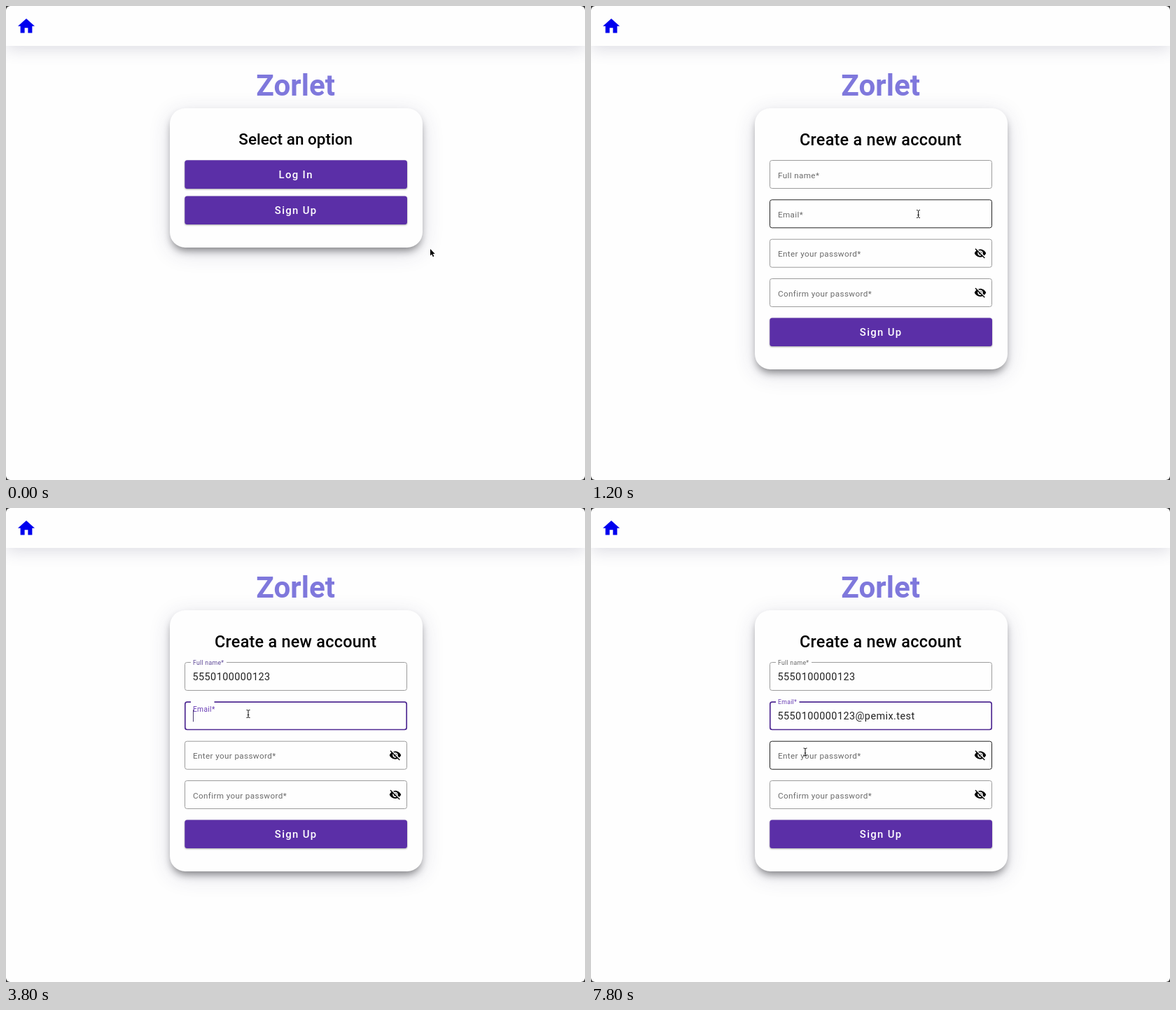
An HTML page that plays this animation: 827x677 px, repeating every 8 s.

```html
<!DOCTYPE html>
<html lang="en">
<head>
<meta charset="utf-8">
<title>Sign up</title>
<style>
  html, body { margin: 0; width: 100%; height: 100%; overflow: hidden; background: #3a3a3a; }
  #stage { position: relative; width: 827px; height: 677px; overflow: hidden; border-radius: 6px; background: #fefefe; }
  #bar { height: 57px; box-shadow: 0 5px 22px rgba(90, 90, 125, .2); }
  #card {
    position: absolute; left: 234px; top: 146px; width: 361px; border-radius: 22px; background: #fefefe;
    box-shadow: 0 7px 12px -3px rgba(0, 0, 0, .45), 0 7px 30px rgba(50, 50, 93, .17);
  }
  svg { position: absolute; left: 0; top: 0; }
  text { font-family: Roboto, sans-serif; white-space: pre; }
  .title { font-size: 42.2px; font-weight: 700; fill: #7f78dc; text-anchor: middle; }
  .heading { font-weight: 500; text-anchor: middle; }
  .button { filter: drop-shadow(0 1px 1px rgba(0, 0, 0, .35)); }
  .caption { font-size: 14.9px; font-weight: 500; letter-spacing: .0893em; fill: #fff; text-anchor: middle; }
  .label { letter-spacing: .031em; }
  .value { font-size: 14.4px; letter-spacing: .03125em; fill: #222; }
</style>
</head>
<body>
<div id="stage">
  <div id="bar"></div>
  <div id="card"></div>
  <svg width="827" height="677">
    <defs>
      <path id="hidden" d="M12 7c2.76 0 5 2.24 5 5 0 .65-.13 1.26-.36 1.83l2.92 2.92c1.51-1.26 2.7-2.89 3.43-4.75-1.73-4.39-6-7.5-11-7.5-1.4 0-2.74.25-3.98.7l2.16 2.16C10.74 7.13 11.35 7 12 7zM2 4.27l2.28 2.28.46.46C3.08 8.3 1.78 10.02 1 12c1.73 4.39 6 7.5 11 7.5 1.55 0 3.03-.3 4.38-.84l.42.42L19.73 22 21 20.73 3.27 3 2 4.27zM7.53 9.8l1.55 1.55c-.05.21-.08.43-.08.65 0 1.66 1.34 3 3 3 .22 0 .44-.03.65-.08l1.55 1.55c-.67.33-1.41.53-2.2.53-2.76 0-5-2.24-5-5 0-.79.2-1.53.53-2.2zm4.31-.78l3.15 3.15.02-.16c0-1.66-1.34-3-3-3l-.17.01z"/>
      <path id="arrow" d="M0 0V9.6L2.2 7.6 3.8 11.3 5.3 10.6 3.7 7H6.7Z" stroke="#fff" stroke-width=".8" paint-order="stroke"/>
      <path id="hand" d="M-1 .7q0-1 1-1t1 1V4l3.6.8q1.1.3 1 1.5L5 9v1.8H0L-2.8 6.6q-.3-1.1.6-1.2L-1 6.4Z" fill="#fff" stroke="#000" stroke-width=".9"/>
      <path id="beam" d="M-2.5-5.5q2 0 2.5 1q.5-1 2.5-1M0-4.5v9M-2.5 5.5q2 0 2.5-1q.5 1 2.5 1M-1.2 1.5h2.4" fill="none" stroke="#111"/>
    </defs>
    <path fill="#00e" transform="translate(14.6 14.4) scale(1.2)" d="M10 20v-6h4v6h5v-8h3L12 3 2 12h3v8z"/>
    <text class="title" x="413.7" y="128">Zorlet</text>
    <g id="scene"></g>
  </svg>
</div>
<script>
const LOOP = 8000, STEP = 200;
const FORM_AT = 1200, NAME_FOCUS = 2480, NAME_FILL = 3200, EMAIL_FOCUS = 3725;
const NAME = '5550100000123', EMAIL = NAME + '@pemix.test';
const PURPLE = '#5b2fa7', GREY = '#6b6b6b';

// [time, characters in the email field]
const TYPING = [[4600, 13], [5200, 14], [5600, 16], [6200, 18], [6400, 20], [6800, 22], [7000, 24]];
// [time, x, y]
const POINTER = [
  [0, 606, 347], [200, 600, 345], [400, 570, 335], [600, 520, 318], [800, 480, 303], [1000, 468.5, 297.3],
  [1200, 467.5, 297], [1400, 462, 295], [1600, 430, 280], [1800, 385, 256], [2000, 361, 248], [2200, 356, 246],
  [3200, 356, 246], [3400, 352, 264], [3600, 346, 291], [3800, 346, 294],
  [7400, 346, 294], [7600, 322, 325], [7800, 306, 348.5]
];

const card = document.getElementById('card');
const scene = document.getElementById('scene');
const clamp = v => Math.max(0, Math.min(1, v));
const mix = (a, b, p) => a + (b - a) * p;

function pointerAt(t) {
  const i = POINTER.findLastIndex(key => key[0] <= t);
  const a = POINTER[i], b = POINTER[i + 1] || a;
  const p = b === a ? 0 : (t - a[0]) / (b[0] - a[0]);
  return { x: mix(a[1], b[1], p), y: mix(a[2], b[2], p) };
}

const isOver = (p, y) => p.x > 255 && p.x < 573 && p.y > y && p.y < y + 41;
const cursor = (shape, p) => `<use href="#${shape}" x="${p.x}" y="${p.y}"/>`;
const heading = (text, size, y, spacing = 0) =>
  `<text class="heading" x="413.7" y="${y}" font-size="${size}" letter-spacing="${spacing}">${text}</text>`;

function button(text, y, hover) {
  return `<rect class="button" x="255.3" y="${y}" width="317.7" height="40.6" rx="3.5" fill="${hover ? '#7349b4' : PURPLE}"/>
    <text class="caption" x="414.2" y="${y + 25.7}">${text}</text>`;
}

function field(y, label, { hover, focused, raised = 0, notch, tint = GREY, value = '', caret, secret }) {
  const stroke = focused ? '#4f2a92' : hover ? '#222' : '#9c9c9c';
  const inset = focused ? .3 : 0;
  return `<rect x="${255.5 + inset}" y="${y + inset}" width="${317 - 2 * inset}" height="${40 - 2 * inset}" rx="3"
      fill="none" stroke="${stroke}" stroke-width="${focused ? 1.7 : 1}"/>
    ${raised ? `<rect x="264" y="${y - 1.5}" width="${notch - 264}" height="3.5" fill="#fefefe"/>` : ''}
    <text class="label" x="267" y="${y + mix(25, 3.4, raised)}" font-size="${mix(11.7, 8.75, raised)}" fill="${tint}">${label}*</text>
    <text class="value" x="266.5" y="${y + 25.2}">${value}</text>
    ${caret ? `<path class="caret" d="M267.5 ${y + 11.5}v17" stroke="#4a3a70"/>` : ''}
    ${secret ? `<use href="#hidden" transform="translate(547 ${y + 10.8}) scale(.75)"/>` : ''}`;
}

function menu(p) {
  const onLogIn = isOver(p, 220), onSignUp = isOver(p, 271);
  return heading('Select an option', 22.5, 198) + button('Log In', 220.3, onLogIn) +
    button('Sign Up', 271.4, onSignUp) + cursor(onLogIn || onSignUp ? 'hand' : 'arrow', p);
}

function form(t, p) {
  const onEmail = t >= EMAIL_FOCUS, onName = t >= NAME_FOCUS && !onEmail;
  const typed = TYPING.findLast(key => key[0] <= t) || [EMAIL_FOCUS, 0];
  const lastInput = onEmail ? typed[0] : t >= NAME_FILL ? NAME_FILL : NAME_FOCUS;
  const blink = (t - lastInput) % 1000 < 500;
  const raise = start => clamp((t - start) / 150);
  const nameTint = onName ? '#6a3fb5' : t >= EMAIL_FOCUS && t < 4000 ? '#5f4a98' : GREY;
  const pointerHidden = t >= 5200 && t < 7000;
  const overField = [220, 276, 333, 389].some(y => isOver(p, y));

  return heading('Create a new account', 23.4, 198.5, .25) +
    field(220.5, 'Full name', {
      hover: isOver(p, 220), focused: onName, raised: raise(NAME_FOCUS), notch: 315,
      tint: nameTint, value: t >= NAME_FILL ? NAME : '', caret: onName && blink
    }) +
    field(276.8, 'Email', {
      hover: isOver(p, 276), focused: onEmail, raised: raise(EMAIL_FOCUS), notch: 297.5,
      tint: onEmail ? '#6a3fb5' : GREY, value: EMAIL.slice(0, typed[1]), caret: onEmail && blink
    }) +
    field(333.2, 'Enter your password', { hover: isOver(p, 333), secret: true }) +
    field(389.5, 'Confirm your password', { hover: isOver(p, 389), secret: true }) +
    button('Sign Up', 445.5, false) +
    (pointerHidden ? '' : cursor(overField ? 'beam' : 'arrow', p));
}

function render(t) {
  const p = pointerAt(t), showForm = t >= FORM_AT;
  card.style.height = (showForm ? 373 : 199) + 'px';
  scene.innerHTML = showForm ? form(t, p) : menu(p);
  const caret = scene.querySelector('.caret');
  if (caret) {
    const width = caret.previousElementSibling.getComputedTextLength();
    caret.setAttribute('transform', `translate(${Math.round(width)} 0)`);
  }
}

let shown = -1;
function tick() {
  const t = Math.floor(performance.now() % LOOP / STEP) * STEP;
  if (t !== shown) render(shown = t);
  requestAnimationFrame(tick);
}
tick();
</script>
</body>
</html>
```
